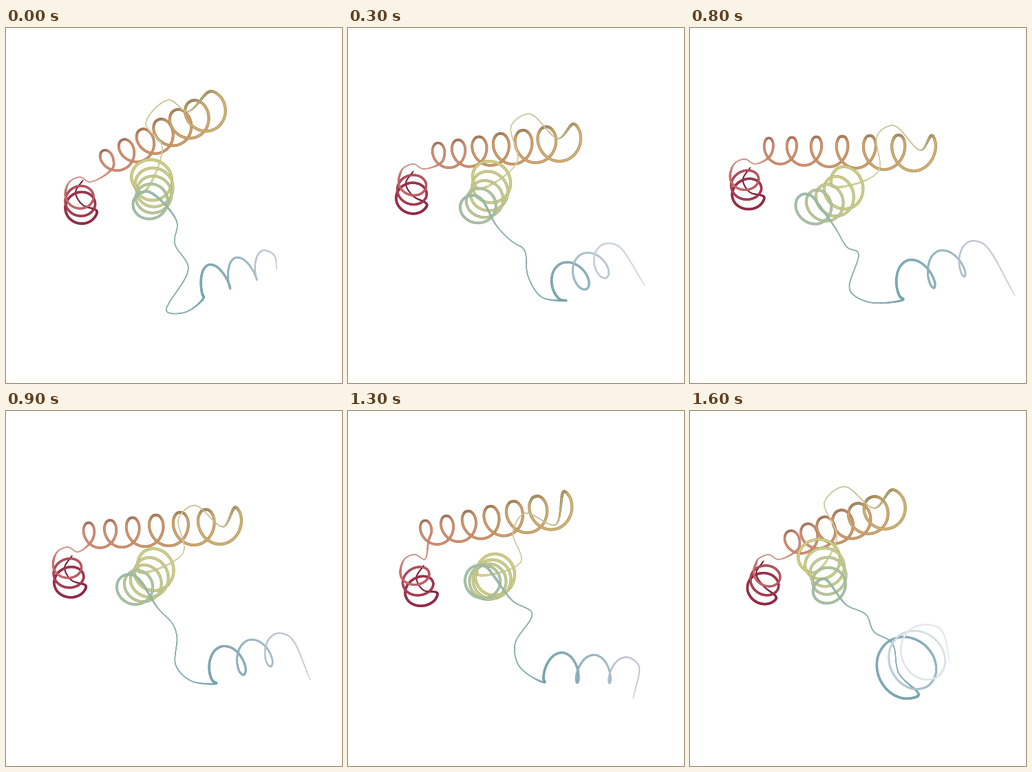
A matplotlib script for the animation above (1700 ms loop, 488 by 514 pixels).

```python
import numpy as np
import matplotlib.pyplot as plt
from matplotlib.animation import FuncAnimation
from matplotlib.collections import LineCollection

W, H, DPI = 488, 514, 64
STEP_MS, STEPS = 100, 17
HOLDS = {700: 600, 1200: 1100}   # times at which the picture pauses
PER_TURN, SUB = 10, 7            # control points per turn, pieces between them
BLUE_LENGTH = 150


def key(coils, blue_radii, loop, tether, tail):
    """Joints of one key pose; coils holds each axis as start x, y, end x, y."""
    return np.vstack([np.reshape(coils, (8, 2)), blue_radii, loop, tether, tail]).astype(float)


# The axes of the red, orange, green and blue coils, then the loose strands.
wide = key([(81, 243, 76, 211), (105, 178, 349, 187),
            (233, 222, 165, 267), (305, 368, 421, 318)], (15, 27),
           [(339, 178), (300, 138), (275, 150), (275, 205)],
           [(206, 292), (222, 322), (246, 323), (232, 380), (262, 399)],
           (479, 380))
steep = key([(114, 270, 128, 241), (157, 201, 271, 121),
             (162, 200, 217, 261), (306, 378, 315, 356)], (24, 24),
            [(238, 125), (192, 97), (161, 125), (187, 172)],
            [(236, 276), (270, 283), (276, 318), (320, 317), (321, 372)],
            (334, 358))
level = key([(106, 268, 89, 230), (93, 174, 319, 147),
             (227, 240, 184, 243), (283, 369, 433, 380)], (9, 22),
            [(314, 173), (270, 158), (255, 185), (264, 228)],
            [(240, 275), (267, 295), (236, 340), (232, 376), (255, 387)],
            (430, 428))
tall = key([(109, 265, 106, 240), (139, 199, 301, 118),
            (210, 213, 206, 259), (281, 369, 386, 338)], (8, 22),
           [(264, 121), (236, 104), (203, 138), (227, 172)],
           [(248, 280), (245, 312), (265, 348), (233, 410), (262, 411)],
           (393, 350))


def swell(joints, factor):
    """The blue coil swings towards the viewer."""
    joints = joints.copy()
    joints[8] *= factor
    return joints


POSES = {
    0: tall,
    200: wide,
    500: steep,
    800: 0.85 * wide + 0.15 * level,
    1100: 0.5 * steep + 0.5 * level,
    1400: level,
    1600: swell(0.7 * steep + 0.3 * wide, 1.8),
}

# First and last phase in turns, first and last radius, true axis length,
# sideways bow and first and last line width.
COILS = [
    ((.27, 2.8), (23, 20), 60, 0, (3.4, 3.0)),
    ((.1, -6.2), (18, 27), 360, 0, (3.2, 3.9)),
    ((.05, 4.5), (29, 23), 150, -8, (3.9, 3.4)),
    ((.25, 2.95), (1, .85), BLUE_LENGTH, 0, (3.3, 2.0)),
]
HEAD = np.array([(3, -45), (-8, -27), (2, -9)])
HOOK = np.array([(-13, -18), (2, -24), (16, -17)])

# Colours run along strand, coil, strand, coil and so on.
COLORS = [
    ["#7d1233", "#8a1233"],
    ["#931436", "#b02a48", "#cf6a63"],
    ["#d98a80", "#dc9a88"],
    ["#d5836a", "#d1925f", "#d0b26a"],
    ["#cfc593", "#d8d7a6"],
    ["#d2cf7c", "#c6cc88", "#97bba8"],
    ["#8fb5ae", "#7fb0b5"],
    ["#6fa5b1", "#90b6c4", "#c8cbd8"],
    ["#d3ccd6", "#e2dde3"],
]


def joints_at(time):
    times = sorted(POSES)
    i = min(np.searchsorted(times, time, side="right"), len(times) - 1)
    t0, t1 = times[i - 1], times[i]
    w = (time - t0) / (t1 - t0)
    return POSES[t0] + (POSES[t1] - POSES[t0]) * w


def ramp(codes, s):
    stops = np.array([[int(c[i:i + 2], 16) / 255 for i in (1, 3, 5)] for c in codes])
    at = np.linspace(0, 1, len(stops))
    return np.column_stack([np.interp(s, at, ch) for ch in stops.T])


def coil(i, start, end, blue_radii):
    """Projected helix: points, position along it and phase angle."""
    phase, radius, length, bow, _ = COILS[i]
    s = np.linspace(0, 1, round(abs(phase[1] - phase[0]) * PER_TURN) + 1)
    axis = end - start
    seen = np.hypot(*axis)
    along = axis / seen
    across = np.array([-along[1], along[0]])
    angle = 2 * np.pi * np.interp(s, [0, 1], phase)
    r = np.interp(s, [0, 1], radius)
    if i == 3:
        a, b = blue_radii
    else:
        # a coil seen from the side looks flat, one seen from its end round
        a, b = np.sqrt(max(0, 1 - (seen / length) ** 2)), 1
    # the long coil bends in depth, so its spacing follows its slope
    growth = 1.4 + 1.3 * axis[1] / axis[0] if i == 1 else 1
    run = (s + (growth - 1) / 2 * s ** 2) / ((1 + growth) / 2)
    u = a * r * np.cos(angle)
    v = b * r * np.sin(angle) + bow * np.sin(np.pi * s)
    points = (start + np.outer(run, axis)
              + np.outer(u, along) + np.outer(v, across))
    return points, s, angle


def chain(joints):
    """Control points of the whole chain with their colours and widths."""
    axes = joints[:8].reshape(4, 2, 2)
    strands = [axes[0, 0] + HEAD, axes[0, 1] + HOOK,
               joints[9:13], joints[13:18], joints[18:]]
    seen = np.hypot(*(axes[3, 1] - axes[3, 0])) / BLUE_LENGTH
    fade = np.clip(1.1 - 1.5 * seen, 0, 0.75)
    points, colors, widths = [], [], []
    for i, strand in enumerate(strands):
        color = ramp(COLORS[2 * i], np.linspace(0, 1, len(strand)))
        points.append(strand)
        colors.append(color + (1 - color) * fade * (i == 4))
        widths.append(np.full(len(strand), 1.7 if i == 0 else 0.9 if i == 4 else 1.4))
        if i == 4:
            break
        pts, s, angle = coil(i, *axes[i], joints[8])
        color = ramp(COLORS[2 * i + 1], s)
        if i == 1:
            color *= 1 - 0.28 * np.clip(-np.sin(angle), 0, 1)[:, None] ** 8
        if i == 3:
            fog = np.clip((s - 0.25) / 0.35, 0, 1)[:, None]
            color += (1 - color) * fade * fog
        points.append(pts)
        colors.append(color)
        widths.append(np.interp(s, [0, 1], COILS[i][4]))
    return np.vstack(points), np.vstack(colors), np.concatenate(widths)


def smooth(p):
    """Hermite curve through unevenly spaced points."""
    h = np.sqrt(np.hypot(*np.diff(p, axis=0).T))
    m = np.gradient(p, np.concatenate([[0], np.cumsum(h)]), axis=0)
    t = (np.arange(SUB) / SUB)[None, :, None]
    h = h[:, None, None]
    p0, p1, m0, m1 = (v[:, None, :] for v in (p[:-1], p[1:], m[:-1], m[1:]))
    curve = (p0 + (p1 - p0) * t ** 2 * (3 - 2 * t)
             + h * t * (1 - t) * (m0 * (1 - t) - m1 * t))
    return np.vstack([curve.reshape(-1, 2), p[-1]])


def spread(values, n):
    return np.interp(np.arange(n) / SUB, np.arange(len(values)), values)


def interleave(a, b):
    return np.stack([a, b], axis=1).reshape(-1, *a.shape[1:])


fig = plt.figure(figsize=(W / DPI, H / DPI), dpi=DPI, facecolor="white")
ax = fig.add_axes([0, 0, 1, 1])
ax.set_xlim(0, W)
ax.set_ylim(H, 0)
ax.axis("off")
tube = LineCollection([], capstyle="butt", joinstyle="round")
ax.add_collection(tube, autolim=False)


def draw(k):
    time = k * STEP_MS
    points, colors, widths = chain(joints_at(HOLDS.get(time, time)))
    path = smooth(points)
    n = len(path)
    color = np.column_stack([spread(ch, n) for ch in colors.T])[:-2]
    width = spread(widths, n)[:-2]
    # each short piece is a dark rim with a lighter core on top
    pieces = np.stack([path[:-2], path[1:-1], path[2:]], axis=1)
    rim = color * (0.78 + 0.22 * color.min(axis=1, keepdims=True))
    core = color + (1 - color) * 0.14
    tube.set_segments(interleave(pieces, pieces))
    tube.set_color(interleave(rim, core))
    tube.set_linewidth(interleave(width, width * 0.5) * 72 / DPI)
    return [tube]


anim = FuncAnimation(fig, draw, frames=STEPS, interval=STEP_MS,
                     repeat=True, repeat_delay=0, blit=False)
plt.show()
```
